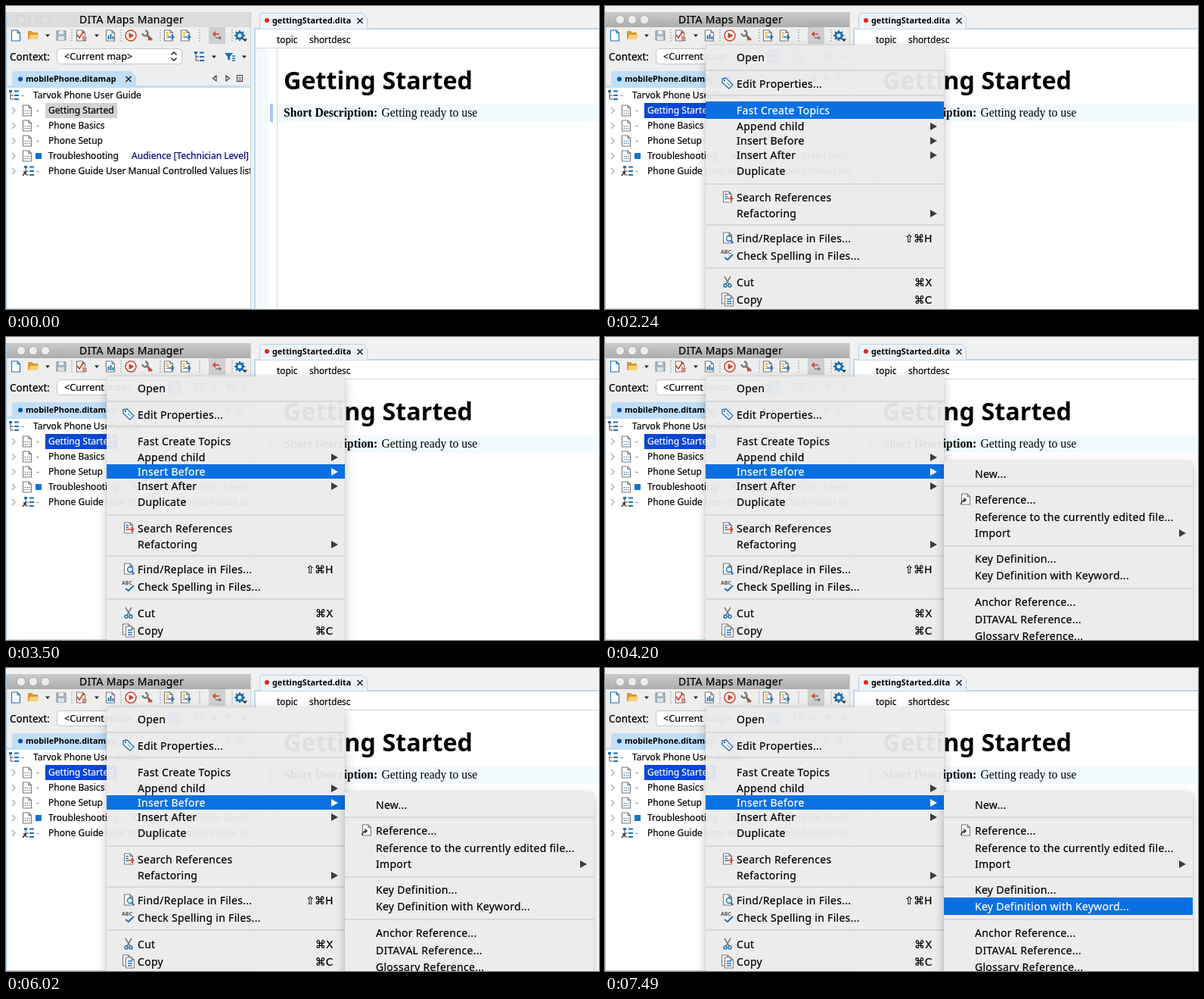
Animation, 784 px wide and 400 px high, one loop 8000 ms. Source, as an HTML page:

```html
<!DOCTYPE html>
<html lang="en">
<head>
<meta charset="utf-8">
<title>DITA Maps Manager</title>
<style>
html, body { margin: 0; width: 100%; height: 100%; overflow: hidden; background: #fff; }
#stage { position: absolute; left: 0; top: 0; width: 784px; height: 400px; overflow: hidden; }
svg, .layer { position: absolute; left: 0; top: 0; width: 784px; height: 400px; }
text { font: 12.05px "Noto Sans", "Open Sans", sans-serif; fill: #000; stroke: #000; stroke-width: .2px; white-space: pre; }
.big { font-size: 14px; letter-spacing: .28px; }
.ctx { font-size: 13.5px; }
.combo { font-size: 12.7px; }
.crumb { font-size: 11.8px; }
.tab { font-size: 10.8px; font-weight: 700; stroke: none; }
.h1 { font-size: 32.3px; font-weight: 700; stroke: none; }
.serif { font: 15.7px "Liberation Serif", serif; stroke: none; }
.b { font-weight: 700; }
.navy { fill: #000080; stroke: #000080; }
.keys { font: 14px "DejaVu Sans", sans-serif; text-anchor: end; }
.abc { font-size: 7px; font-weight: 700; fill: #555; stroke: none; }
.dash { fill: #777; stroke: none; }
.lit text { fill: #fff; stroke: #fff; }
.panel { position: absolute; background: rgba(237, 235, 237, .95); box-shadow: 0 4px 14px rgba(0, 0, 0, .25), 0 0 1px rgba(0, 0, 0, .35); }
#menu .panel { left: 133px; top: 52px; width: 315px; height: 380px; border-radius: 5px; }
#sub .panel { left: 448px; top: 164px; width: 329px; height: 270px; border-radius: 0 5px 5px 5px; }

#active, #menu, #sub, #menu .lit, #sub .lit { animation: 8s step-end infinite; }
#active { animation-name: active; }
#menu { animation-name: menu; }
#sub { animation-name: sub; }
#menu .lit { animation-name: menuRow; }
#sub .lit { animation-name: subRow; }
@keyframes active { 0% { visibility: hidden; } 14.87%, 100% { visibility: visible; } }
@keyframes menu { 0% { visibility: hidden; } 28%, 100% { visibility: visible; } }
@keyframes menuRow {
  0% { clip-path: inset(126px 336px 251px 133px); }
  40.25% { clip-path: inset(149px 336px 232px 133px); }
  42.87% { clip-path: inset(168px 336px 213px 133px); }
  67.37% { clip-path: inset(187px 336px 194px 133px); }
  73.5%, 100% { clip-path: inset(168px 336px 213px 133px); }
}
@keyframes sub {
  0% { visibility: hidden; transform: none; }
  45.5% { visibility: visible; transform: none; }
  67.37% { visibility: hidden; transform: none; }
  70% { visibility: visible; transform: translateY(19px); }
  73.5% { visibility: hidden; transform: none; }
  75.2%, 100% { visibility: visible; transform: none; }
}
@keyframes subRow {
  0% { clip-path: inset(400px 0 0 0); }
  71.75% { clip-path: inset(169px 7px 208px 448px); }
  73.5% { clip-path: inset(400px 0 0 0); }
  82.25% { clip-path: inset(169px 7px 208px 448px); }
  84.87% { clip-path: inset(203px 7px 174px 448px); }
  87.5% { clip-path: inset(226px 7px 151px 448px); }
  90.12% { clip-path: inset(249px 7px 130px 448px); }
  91.87% { clip-path: inset(281px 7px 97px 448px); }
  93.6%, 100% { clip-path: inset(303px 7px 74px 448px); }
}
</style>
</head>
<body>
<div id="stage">
  <svg id="base"></svg>
  <svg id="active"></svg>
  <div id="menu" class="layer"><div class="panel"></div><svg class="plain"></svg><svg class="lit"></svg></div>
  <div id="sub" class="layer"><div class="panel"></div><svg class="plain"></svg><svg class="lit"></svg></div>
</div>
<script>
const BLUE = '#1f6fb5', RED = '#d0402b', GREY = '#555';
const text = (x, y, s, cls = '') => `<text x="${x}" y="${y}" class="${cls}">${s}</text>`;
const rect = (x, y, w, h, fill, more = '') => `<rect x="${x}" y="${y}" width="${w}" height="${h}" fill="${fill}" ${more}/>`;
const line = (d, stroke = GREY, w = 1, fill = 'none', more = '') => `<path d="${d}" stroke="${stroke}" stroke-width="${w}" fill="${fill}" ${more}/>`;
const fill = (d, color) => `<path d="${d}" fill="${color}"/>`;
const circle = (x, y, r, color, more = '') => `<circle cx="${x}" cy="${y}" r="${r}" fill="${color}" ${more}/>`;
const at = (x, y, s) => `<g transform="translate(${x} ${y})">${s}</g>`;
const put = (query, s) => { document.querySelector(query).innerHTML = s; };

// icons, centred on 0,0
const page = color => line('M-5.5 -7H2L5.5 -3.5V7H-5.5ZM2 -7V-3.5H5.5', color, 1.1, '#fff');
const caret = fill('M-3 -1.5H3L0 2Z', '#222');
const dots = line('M0 -8V9', '#999', 1.2, 'none', 'stroke-dasharray="1.5 2"');
const cross = line('M-3.5 -3.5L3.5 3.5M3.5 -3.5L-3.5 3.5', '#222', 1.6);
const tree = line('M-4 -5V5H0M-4 0H0', '#444') + rect(-6, -7, 4, 3, BLUE)
  + line('M1 -5.5H7M1 0H7M1 5H7', BLUE, 2);
const chevron = line('M-2 -4L2 0L-2 4', '#aaa', 1.3);
const topic = page('#777') + line('M-3.5 0.5H4M-3.5 3.5H4', '#5a88ad', 1, 'none', 'stroke-dasharray="2 1"');
const arrow = color => line('M-1 2H6M3.5 -1L6.5 2L3.5 5', color, 1.7);
const lines = color => line('M-3.5 -3.5H0M-3.5 -.5H0M-3.5 2.5H-1', color, 1.4);
const send = page('#777') + lines('#e09a20') + arrow(BLUE);
const search = page('#777') + lines(BLUE) + arrow(RED);
const link = page('#777') + line('M-6 7C-6 3 -4 1 0 1M-3 -1.5L0 1L-3 4', '#333', 1.6);
const spin = color => line('M-3.5 -2L0 -5.5L3.5 -2M-3.5 2L0 5.5L3.5 2', color, 1.7);
const gear = circle(0, 0, 4, 'none', `stroke="${BLUE}" stroke-width="3"`)
  + line('M0 -7V-4M0 4V7M-7 0H-4M4 0H7M-5 -5L-3 -3M3 3L5 5M5 -5L3 -3M-3 3L-5 5', BLUE, 2);
const save = rect(-6, -6, 12, 12, '#a9b6c0', 'stroke="#7f909c"') + rect(-3, -6, 6, 4, '#edf1f3') + rect(-4, 1, 8, 5, '#dce3e7');
const folder = fill('M-7 5V-6H-2L0 -4H6V5Z', '#d99a2b') + fill('M-6 5L-4 -1H8L6 5Z', '#f8cf78');
const check = page('#777') + line('M-5 -1L-2 3L4 -6', RED, 1.8) + line('M3 0V6H8M3 3H8', RED, 1.2);
const chart = page('#777') + line('M-2.5 5V0M.5 5V-2M3.5 5V1', BLUE, 2);
const play = circle(0, 0, 7, '#fff', `stroke="${RED}" stroke-width="1.5"`) + fill('M-2.5 -4V4L4.5 0Z', RED);
const wrench = line('M-1 -1L6 6', '#777', 3) + line('M-3 -6.5A3.5 3.5 0 1 1 -6.5 -3', '#777', 2.4)
  + fill('M1 1V7L6 4Z', RED);
const swap = line('M-5 -2H3M-2 -5L-5 -2L-2 1', RED, 1.7) + line('M-2 3H5M3 1L5 3L3 5', '#777', 1.5);
const funnel = fill('M-7 -5H4L0 0V5L-3 3V0Z', BLUE) + line('M3 -1H7M3 2H7M3 5H7', BLUE, 1.3);

function titleBar(color, lamp, edge) {
  const lamps = [20, 36, 52].map(x => circle(x, 18, 5.7, lamp, `stroke="${edge}" stroke-width=".7"`)).join('');
  return rect(1, 8, 322, 20, color) + lamps + text(97, 23, 'DITA Maps Manager', 'big');
}

const toolbar = [
  [13, page(BLUE)], [36, folder], [55, caret], [73, save], [87, dots], [99, check], [120, caret],
  [138, chart], [152, dots], [165, play], [187, wrench], [204, dots], [215, send], [237, send],
  [256, dots], [279, rect(-11, -11, 22, 22, '#cfcfcf') + swap], [299, dots], [309, gear]
].map(([x, icon]) => at(x, 39, icon)).join('') + at(316, 45, caret);

const rows = ['Getting Started', 'Phone Basics', 'Phone Setup', 'Troubleshooting',
  'Phone Guide User Manual Controlled Values list'];
const outline = at(10, 118, tree) + text(20, 122, '-', 'dash') + text(36, 122, 'Tarvok Phone User Guide')
  + rect(52, 128, 95, 20, '#d2d2d2')
  + rows.map((name, i) => {
    const y = 138 + i * 20;
    const mark = i === 3 ? rect(39, y - 4, 8, 8, '#0b74d1') : text(40, y + 4, '-', 'dash');
    const icon = i < 4 ? topic : at(2, 0, tree) + line('M-6 6L-2 1M-5 1H-2V4', '#333', 1.5);
    return at(10, y, chevron) + at(28, y, icon) + mark + text(56, y + 4, name);
  }).join('') + text(166, 202, 'Audience [Technician Level]', 'navy');

const manager = rect(0, 0, 784, 400, '#f1f1f1') + rect(0, 28, 323, 80, '#eeeeee')
  + titleBar('#dcdcdc', '#dfdfdf', '#cbcbcb') + toolbar
  + text(5, 72, 'Context:', 'ctx') + rect(67.5, 56.5, 165, 20, '#fff', 'rx="4" stroke="#c5c5c5"')
  + text(77, 71, '&lt;Current map&gt;', 'combo') + at(222, 66.5, spin('#333'))
  + at(255, 67, tree) + at(275, 67, caret) + at(296, 67, funnel) + at(315, 67, caret)
  + fill('M8 107V90Q8 86 12 86H166L172 92V107Z', '#c0def8') + rect(1, 105, 322, 3, '#c0def8')
  + circle(19, 96.5, 3, '#0a50b8') + text(26, 100, 'mobilePhone.ditamap', 'tab') + at(162, 96.5, cross)
  + line('M278 92L273.5 95.5L278 99ZM291 92L295.5 95.5L291 99Z', '#333', 1.1)
  + rect(305.5, 91.5, 7, 8, '#fff', 'stroke="#333"') + line('M307 94H311M307 96H311M307 98H311', '#333', .8)
  + rect(1, 108, 322, 292, '#fff') + outline
  + rect(0, 8, 1.3, 392, '#a9cdea') + rect(0, 399, 323, 1, '#c0d5e4');

const editor = rect(323, 0, 461, 400, '#f1f1f1') + rect(323, 8, 1, 392, '#bfd2df')
  + rect(328, 30, 456, 370, '#fff') + rect(328, 29, 456, 2, '#bcd8ef') + rect(328, 30, 2, 370, '#bcd8ef')
  + line('M335.5 30V13Q335.5 9.5 339 9.5H471L477.5 16V30', '#bcd0df', 1, '#edf3f8')
  + circle(345, 19, 3, '#d92b1c') + text(352, 23, 'gettingStarted.dita', 'tab') + at(468, 19.5, cross)
  + text(358, 49, 'topic', 'crumb') + text(401, 49, 'shortdesc', 'crumb') + rect(330, 55, 454, 1, '#cfd6da')
  + rect(331, 56, 15, 344, '#f1fafd') + rect(358, 56, 1, 344, '#c9deea')
  + rect(359, 130, 425, 23, '#f1fafd') + rect(349, 129, 4, 24, '#a5c8f4')
  + text(367, 110, 'Getting Started', 'h1')
  + text(367, 146, 'Short Description:', 'serif b') + text(496.5, 146, 'Getting ready to use', 'serif');

put('#base', manager + editor);
put('#active', '<defs><linearGradient id="bar" x2="0" y2="1"><stop stop-color="#cbcbcb"/><stop offset="1" stop-color="#acacac"/></linearGradient></defs>'
  + titleBar('url(#bar)', '#ececec', '#979797')
  + rect(214, 58, 17, 17, '#2483ee', 'rx="4"') + at(222.5, 66.5, spin('#fff'))
  + rect(52, 128, 95, 20, '#0847d6') + '<g class="lit">' + text(56, 142, 'Getting Started') + '</g>');

// menu rows: centre y, label, shortcut ('>' opens a submenu), icon
const tag = line('M-7 -6L-2 -7L7 2L2 7L-7 -1Z', BLUE, 1.3, '#fff') + circle(-4, -4, 1.2, BLUE) + line('M-1 -1L3 3', BLUE, 1);
const find = page('#777') + circle(2, 1, 3.5, '#e8f3fb', `stroke="${BLUE}" stroke-width="1.4"`) + line('M4.5 4L7.5 7', BLUE, 2);
const spell = text(-9, -2, 'ABC', 'abc') + line('M-4 3L0 6L7 -1', BLUE, 2);
const ring = x => circle(x, 5, 2, 'none', `stroke="${BLUE}" stroke-width="1.5"`);
const cut = line('M-4 -7L2 3M4 -7L-2 3', '#777', 1.5) + ring(-3) + ring(3);
const copy = at(-2, -1, page('#777')) + at(2, 2, page('#777')) + line('M-1 0H5M-1 3H5M-1 6H5', BLUE, 1.3);
const menuRows = [
  [68, 'Open'], [103, 'Edit Properties...', '', tag], [138, 'Fast Create Topics'],
  [159, 'Append child', '>'], [178, 'Insert Before', '>'], [197, 'Insert After', '>'], [218, 'Duplicate'],
  [253, 'Search References', '', search], [274, 'Refactoring', '>'],
  [307, 'Find/Replace in Files...', '⇧⌘H', find], [330, 'Check Spelling in Files...', '', spell],
  [365, 'Cut', '⌘X', cut], [388, 'Copy', '⌘C', copy]
];
const subRows = [
  [181, 'New...'], [215, 'Reference...', '', link], [238, 'Reference to the currently edited file...'],
  [259, 'Import', '>'], [293, 'Key Definition...'], [315, 'Key Definition with Keyword...'],
  [350, 'Anchor Reference...'], [373, 'DITAVAL Reference...'], [395, 'Glossary Reference...']
];

function buildMenu(id, list, x, width, seps) {
  const draw = color => list.map(([y, label, key = '', icon = '']) => {
    const end = x + width - 18;
    const right = key === '>' ? fill(`M${end} ${y - 5}V${y + 5}L${end + 9} ${y}Z`, color)
      : key && text(x + width - 15.5, y + 5, key, 'keys');
    return at(x + 29, y - 1, icon) + text(x + 41, y + 5, label, 'big') + right;
  }).join('');
  put(id + ' .plain', seps.map(y => rect(x, y, width, 2, '#d8d7d9')).join('') + draw('#3c3c3c'));
  put(id + ' .lit', rect(x, 0, width, 400, '#0a70e2') + draw('#fff'));
}
buildMenu('#menu', menuRows, 133, 315, [84, 117, 234, 288, 345]);
buildMenu('#sub', subRows, 448, 329, [196, 275, 331]);
</script>
</body>
</html>
```
